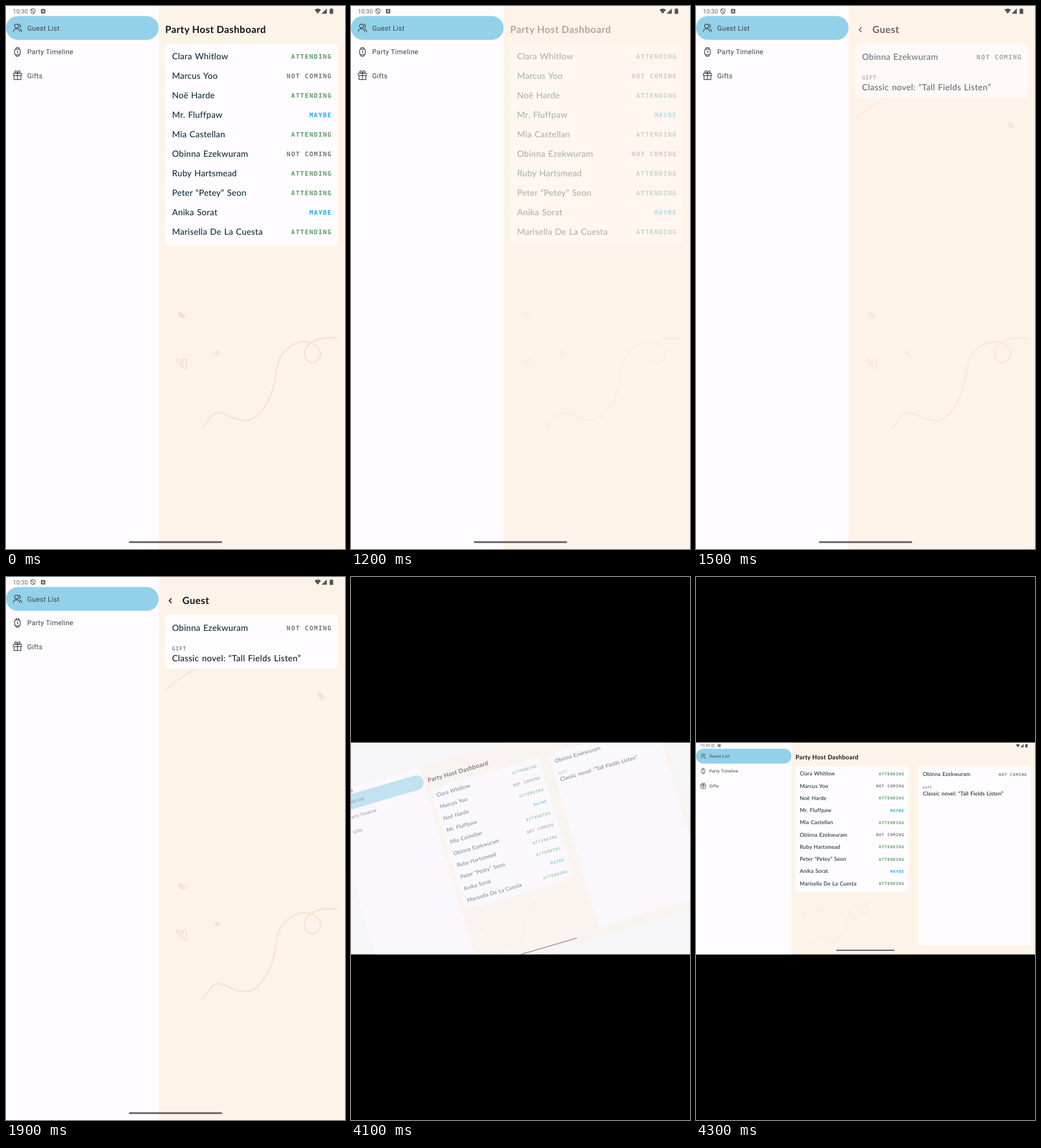
These frames come from a looping animation (592 by 947 pixels, 8000 ms). An HTML page:

```html
<!DOCTYPE html>
<html lang="en">
<head>
<meta charset="utf-8">
<title>Party Host Dashboard</title>
<style>
  html, body { margin: 0; width: 100%; height: 100%; overflow: hidden; background: #000; }
  svg { display: block; width: 100vw; height: 100vh; }
  text { text-rendering: geometricPrecision; white-space: pre; }
  .title { font: 700 17px Lato, sans-serif; letter-spacing: .46px; fill: #121316; }
  .name { font: 500 15px Lato, sans-serif; letter-spacing: .2px; word-spacing: 1px; fill: #15303e; }
  .gift { letter-spacing: .3px; fill: #1b1b1f; }
  .status { font: 700 11px "DejaVu Sans Mono", monospace; letter-spacing: 1.3px; text-anchor: end; }
  .label { font: 400 9px "DejaVu Sans Mono", monospace; letter-spacing: .95px; fill: #3f545f; }
  .nav { font: 400 12px Roboto, sans-serif; letter-spacing: .3px; fill: #3d4347; }
  .clock { font: 400 10.5px Roboto, sans-serif; fill: #656467; }
  .icon { fill: none; stroke: #3d4347; stroke-width: 1.25; stroke-linecap: round; stroke-linejoin: round; }
  .deco { fill: none; stroke: #f6e3d2; stroke-width: 2.6; stroke-linecap: round; stroke-linejoin: round; }
  .deco ellipse { fill: #f6e3d2; stroke: none; }
</style>
</head>
<body>
<svg viewBox="0 0 592 947" preserveAspectRatio="none">
  <defs><clipPath id="band"><rect y="288.7" width="592" height="369.6"/></clipPath></defs>
  <g id="upright"></g>
  <g id="sideways"></g>
</svg>
<script>
const PAPER = '#fefcff', CREAM = '#fef3e8', SCALE = 0.625;
const COLORS = { ATTENDING: '#5a9e64', 'NOT COMING': '#77767a', MAYBE: '#23b0e4' };
const A = 'ATTENDING', N = 'NOT COMING', M = 'MAYBE';
const guests = [
  ['Clara Whitlow', A], ['Marcus Yoo', N], ['Noë Harde', A], ['Mr. Fluffpaw', M],
  ['Mia Castellan', A], ['Obinna Ezekwuram', N], ['Ruby Hartsmead', A],
  ['Peter “Petey” Seon', A], ['Anika Sorat', M], ['Marisella De La Cuesta', A]
];

const $ = id => document.getElementById(id);
const clamp = v => Math.max(0, Math.min(1, v));
const text = (cls, x, y, s) => `<text class="${cls}" x="${x}" y="${y}">${s}</text>`;
const rect = (x, y, w, h, fill, r = 0) =>
  `<rect x="${x}" y="${y}" width="${w}" height="${h}" rx="${r}" fill="${fill}"/>`;
const blob = (x, y, rx, ry, turn) =>
  `<ellipse rx="${rx}" ry="${ry}" transform="translate(${x} ${y}) rotate(${turn})"/>`;

const guestLine = (x, w, y, [name, status]) => text('name', x + 12, y, name) +
  `<text class="status" x="${x + w - 10.7}" y="${y - .9}" fill="${COLORS[status]}">${status}</text>`;

const deco = (attrs = '') => `<g class="deco" ${attrs}>
  <path d="M342 736C352 726 360 709 370 709C384 709 398 723 417 723C446 723 466 680 471 645
    C474 622 477 612 487 602C500 588 516 584 527 586C545 590 551 602 549 610
    C546 619 539 622 534 622C525 621 520 612 522 602C526 586 550 574 579 580"/>
  <path d="M314 634C308 628 298 624 298 618C299 614 306 617 307 626C308 618 312 612 314 616C316 622 315 628 314 634Z"/>
  <path d="M279 197C292 184 308 174 330 160" stroke-width="2"/>
  ${blob(306.5, 539.5, 7.5, 4.5, 38)}${blob(368.5, 604.5, 3.8, 4.8, -20)}${blob(550, 208, 7.5, 4.2, 40)}
</g>`;

const list = w => text('title', 278, 47, 'Party Host Dashboard') +
  rect(278, 65.5, w, 351.5, PAPER, 8) +
  guests.map((g, i) => guestLine(278, w, 92.6 + 34 * i, g)).join('');

const detail = (x, w, h) => rect(x, 65.5, w, h, PAPER, 8) +
  guestLine(x, w, 94, guests[5]) +
  text('label', x + 12, 128, 'GIFT') +
  text('name gift', x + 12, 147.3, 'Classic novel: “Tall Fields Listen”');

const nav = h => rect(0, 0, 266.5, h, PAPER) + rect(0, 17.5, 266.5, 41.5, '#93d1ea', 20.75) +
  ['Guest List', 'Party Timeline', 'Gifts'].map((s, i) => text('nav', 37, 42.7 + 41.5 * i, s)).join('') +
  `<g class="icon">
    <circle cx="18.3" cy="35" r="3.3"/><path d="M13 44.7c0-6.4 10.6-6.4 10.6 0M22.6 31.8a3.3 3.3 0 0 1 .4 6.3M24.6 40.4q2.4 1 2.6 4.2"/>
    <rect x="15" y="75" width="10" height="10" rx="3"/>
    <path d="M17 75l.7-2.5h4.6l.7 2.5M17 85l.7 2.5h4.6l.7-2.5M20 77.8v2.5l1.4 1"/>
    <rect x="12.8" y="117.4" width="14.4" height="4" rx=".8"/>
    <path d="M14 121.4v7h12v-7M20 117.4v11M20 117.2c-6 .4-5.4-4.6-2.6-4.2c1.6.4 2.4 2.6 2.6 4.2c.2-1.6 1-3.8 2.6-4.2c2.8-.4 3.4 4.6-2.6 4.2"/>
  </g>`;

const systemBars = (w, h) => text('clock', 12, 12.6, '10:30') +
  `<path d="M47 4.7l3.7 1.3v3q0 3-3.7 4.6q-3.7-1.6-3.7-4.6v-3zM43.8 5.6l6 7" fill="none" stroke="#656467" stroke-width="1.1"/>` +
  rect(61, 5.3, 7.6, 7.6, '#59585b', 1) +
  `<path d="M62.8 11.4l2-4.6l2 4.6M63.5 10h2.6" fill="none" stroke="#fff" stroke-width=".9"/>
  <path transform="translate(${w - 592})" fill="#555457"
    d="M538.8 6.6q5.6-4 11.2 0l-5.6 6.9zM551 13.4l9.2-9.2v9.2zM565.2 5.2h1.6v-1h3v1h1.6v8.6h-6.2z"/>` +
  rect(w / 2 - 81.5, h - 13.5, 163, 3, '#5f5e60', 1.5);

const screen = (w, h, content) => rect(0, 0, w, h, CREAM) + content + nav(h) + systemBars(w, h);

$('upright').innerHTML = screen(592, 947,
  `<g id="listPane">${deco()}${list(302)}</g>
   <g id="detailPane">${deco()}
     <path d="M289 37.4l-4 4l4 4" fill="none" stroke="#121316" stroke-width="1.6"/>
     ${text('title', 308, 47, 'Guest')}${detail(278, 302, 94.5)}</g>`);

$('sideways').innerHTML = screen(947, 592,
  deco('transform="translate(79.4 25.1) scale(.73)" opacity=".6"') + list(315) + detail(622, 314, 501.5));

// The rotating screens sit in a letterboxed band.
const svg = document.querySelector('svg');
const band = document.createElementNS(svg.namespaceURI, 'g');
band.setAttribute('clip-path', 'url(#band)');
band.innerHTML = rect(0, 288, 592, 371, '#f6f5f8');
band.append($('upright'), $('sideways'));
svg.append(band);

const set = (id, name, value) => $(id).setAttribute(name, value);
const show = (id, on) => set(id, 'visibility', on ? 'visible' : 'hidden');

function draw(t) {
  const turning = t >= 4000, turned = t >= 4100;
  if (turning) band.setAttribute('clip-path', 'url(#band)');
  else band.removeAttribute('clip-path');

  show('upright', !turned);
  show('sideways', turned);
  set('listPane', 'opacity', clamp(1 - (t - 1100) / 150));
  set('detailPane', 'opacity', clamp((t - 1250) / 400));
  set('upright', 'transform', turning
    ? `translate(296 473.5) rotate(-86.13) scale(${SCALE}) translate(-296 -473.5)` : '');

  const left = clamp((4300 - t) / 200);
  set('sideways', 'transform', `rotate(${-16.3 * left * left} 296 473.5) translate(0 288.5) scale(${SCALE})`);
  set('sideways', 'opacity', 1 - .47 * left ** 1.5);
}

const start = performance.now();
function tick() {
  const t = (performance.now() - start) % 8000;
  draw(Math.floor(t / 100) * 100);
  requestAnimationFrame(tick);
}
tick();
</script>
</body>
</html>
```
